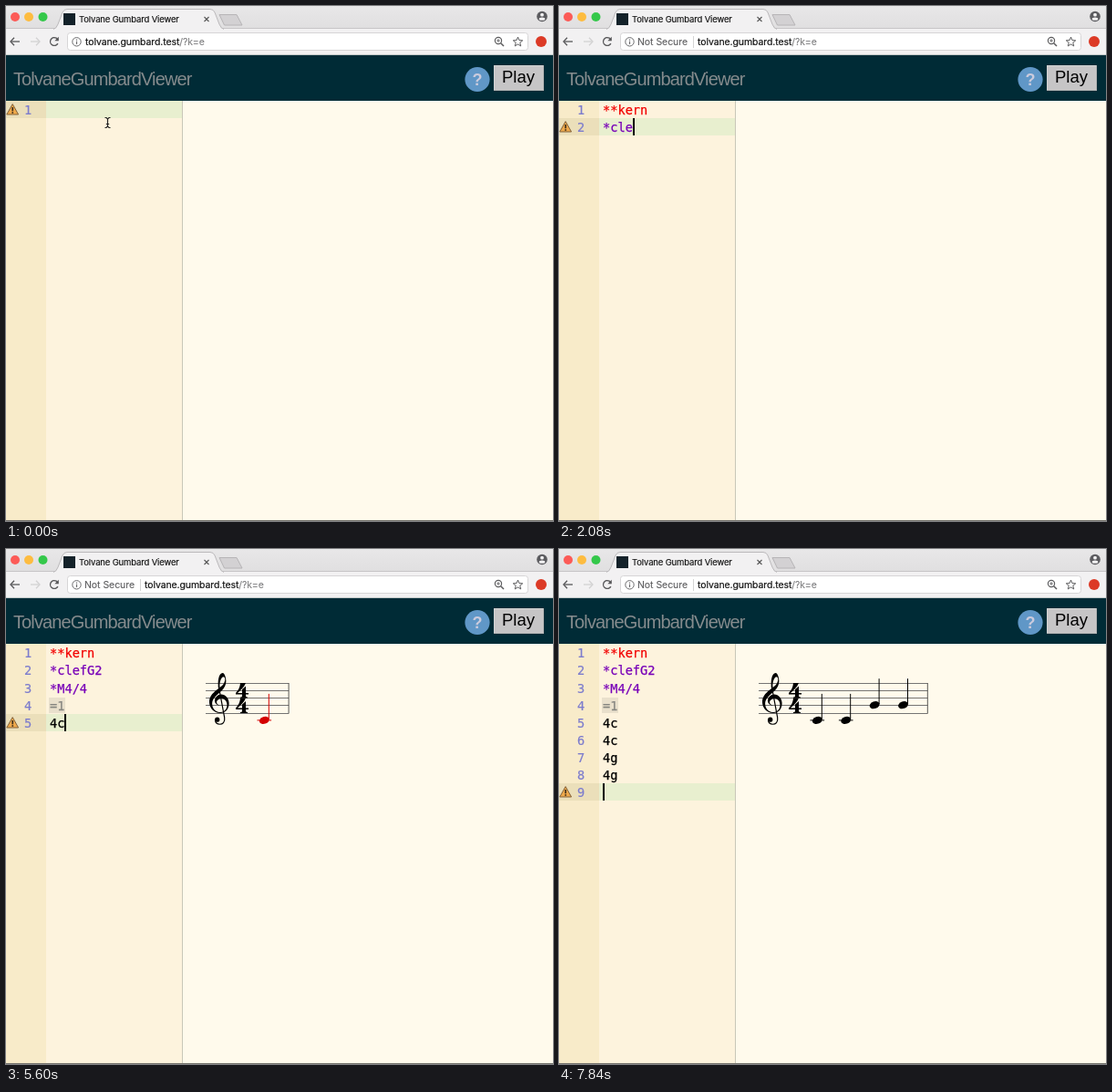
Animation of 600x565 px, one loop 8 s. Source, as an HTML page with a canvas:

```html
<!DOCTYPE html>
<html lang="en">
<head>
<meta charset="utf-8">
<title>Score editor</title>
<style>
html, body { margin: 0; width: 100%; height: 100%; overflow: hidden; background: #fffaec; }
canvas { display: block; width: 600px; height: 565px; }
</style>
</head>
<body>
<canvas id="stage"></canvas>
<script>
const LOOP = 8000, STEP = 160;
const W = 600, H = 565;
const UI = 'Inter, Roboto, sans-serif';
const ARIAL = '"Liberation Sans", Arial, sans-serif';
const MONO = '13.65px "DejaVu Sans Mono", monospace';
const CHAR = 8.22, LINE = 19.13, TOP = 104.3, TEXT_X = 48;

// Typing: start time, time per key, keys
const TYPING = [
  [480, 320, '**'], [960, 80, 'ker'], [1280, 160, 'n\n'],
  [1600, 160, '*clefG2'], [2880, 320, '\n*'], [3360, 160, 'M4/4'],
  [4160, 320, '\n='], [4640, 320, '1\n'], [5280, 160, '4c'],
  [5760, 160, '\n4c'], [6880, 80, '\n4g'], [7280, 160, '\n'],
  [7440, 80, '4g'], [7680, 160, '\n']
];

const canvas = document.getElementById('stage');
const g = canvas.getContext('2d');
const dpr = window.devicePixelRatio || 1;
canvas.width = W * dpr;
canvas.height = H * dpr;

function typedAt(t) {
  let text = '', last = 160;
  for (const [start, gap, keys] of TYPING) {
    [...keys].forEach((key, i) => {
      const at = start + i * gap;
      if (at <= t) { text += key; last = at; }
    });
  }
  return { text, last, lines: text.split('\n') };
}

function rect(x, y, w, h, color) {
  g.fillStyle = color;
  g.fillRect(x, y, w, h);
}

function dot(x, y, r, color) {
  g.fillStyle = color;
  g.beginPath();
  g.arc(x, y, r, 0, Math.PI * 2);
  g.fill();
}

function ring(x, y, r, color, width = 1, from = 0, to = Math.PI * 2) {
  g.strokeStyle = color;
  g.lineWidth = width;
  g.beginPath();
  g.arc(x, y, r, from, to);
  g.stroke();
}

// Points as a flat list x, y, x, y...
function trace(p) {
  g.beginPath();
  for (let i = 0; i < p.length; i += 2) g.lineTo(p[i], p[i + 1]);
}

function poly(p, fill, stroke) {
  trace(p);
  g.closePath();
  g.fillStyle = fill;
  g.fill();
  if (stroke) { g.strokeStyle = stroke; g.lineWidth = 1; g.stroke(); }
}

function line(p, color, width = 1) {
  trace(p);
  g.strokeStyle = color;
  g.lineWidth = width;
  g.stroke();
}

// weight adds a hairline outline, as heavier font smoothing does
function label(str, x, y, font, color, spacing = 0, weight = 0) {
  g.font = font;
  g.letterSpacing = spacing + 'px';
  g.fillStyle = g.strokeStyle = color;
  g.fillText(str, x, y);
  if (weight) {
    g.lineWidth = weight;
    g.strokeText(str, x, y);
  }
  const width = g.measureText(str).width;
  g.letterSpacing = '0px';
  return width;
}

function drawTabs() {
  const bar = g.createLinearGradient(0, 0, 0, 25);
  bar.addColorStop(0, '#e8e7e8');
  bar.addColorStop(1, '#e0dfe0');
  rect(0, 0, W, 26, bar);
  rect(0, 25, W, 29, '#f2f1f2');
  line([0, 24.5, W, 24.5], '#c6c4c6');
  g.beginPath();
  g.moveTo(52, 25.5);
  g.quadraticCurveTo(55, 25, 57, 20);
  g.lineTo(62, 7);
  g.quadraticCurveTo(63.5, 3.5, 67, 3.5);
  g.lineTo(224, 3.5);
  g.quadraticCurveTo(227.5, 3.5, 229, 7);
  g.lineTo(234, 20);
  g.quadraticCurveTo(236, 25, 239, 25.5);
  g.fillStyle = '#f2f1f2';
  g.fill();
  g.strokeStyle = '#bbb9bb';
  g.lineWidth = 1;
  g.stroke();
  rect(53, 25, 185, 2, '#f2f1f2');

  dot(10, 12, 5, '#fc5b57');
  dot(25, 12, 5, '#fdbc40');
  dot(40.5, 12, 5, '#34c84a');
  rect(63, 8, 13, 13, '#14222a');
  label('Tolvane Gumbard Viewer', 80, 18, '9.5px ' + UI, '#111', -0.15, 0.15);
  line([217.5, 12, 222.5, 17], '#555', 1.1);
  line([222.5, 12, 217.5, 17], '#555', 1.1);
  poly([234, 9.5, 253, 9.5, 259, 21, 239.5, 21], '#d3d1d3', '#b6b4b6');
  dot(588, 11.5, 5.8, '#5b5b5f');
  dot(588, 9.7, 1.9, '#f2f1f2');
  g.beginPath();
  g.ellipse(588, 14.2, 3.3, 1.6, 0, 0, Math.PI * 2);
  g.fill();
}

function arrow(x, dir, color) {
  line([x - 5 * dir, 39, x + 5 * dir, 39], color, 1.3);
  line([x + dir, 34.8, x + 5 * dir, 39, x + dir, 43.2], color, 1.3);
}

function drawToolbar(t) {
  arrow(10, -1, '#58585a');
  arrow(32, 1, '#d3d2d3');
  ring(53, 39, 4.4, '#58585a', 1.4, 0.5, 5.6);
  poly([57.8, 33.8, 57.8, 38.3, 53.3, 38.3], '#58585a');
  g.beginPath();
  g.roundRect(67.5, 29.5, 505, 19, 3);
  g.fillStyle = '#fff';
  g.fill();
  g.strokeStyle = '#d6d5d6';
  g.lineWidth = 1;
  g.stroke();

  ring(77.5, 39.3, 4.7, '#6a6a6c');
  rect(77, 36.5, 1.1, 1.2, '#6a6a6c');
  rect(77, 38.6, 1.1, 3.4, '#6a6a6c');

  // The security notice slides the address to the right
  const p = Math.max(0, Math.min(1, (t - 384) / 400));
  if (p > 0) {
    g.save();
    g.beginPath();
    g.rect(85, 30, 58 * p - (p < 1 ? 5 : 0), 18);
    g.clip();
    g.globalAlpha = p;
    if (p < 1) label('Not Secure', 90, 42, '8.3px ' + UI, '#777');
    else label('Not Secure', 86, 43, '10.5px ' + UI, '#5c5c5e', -0.05, 0.1);
    g.restore();
    if (p === 1) line([147.5, 33, 147.5, 46], '#d5d5d5');
  }
  const x = 87 + 65 * p;
  const host = label('tolvane.gumbard.test', x, 43, '10.5px ' + UI, '#151515', -0.1, 0.2);
  label('/?k=e', x + host, 43, '10.5px ' + UI, '#7d7d7f', -0.1, 0.1);

  ring(540, 38, 3.6, '#5c5c5e', 1.2);
  line([542.7, 40.7, 546, 44], '#5c5c5e', 1.5);
  line([538.2, 38, 541.8, 38], '#5c5c5e', 0.9);
  line([540, 36.2, 540, 39.8], '#5c5c5e', 0.9);
  const star = [];
  for (let i = 0; i < 10; i++) {
    const r = i % 2 ? 2.4 : 5.5, a = i * Math.PI / 5 - Math.PI / 2;
    star.push(561.5 + r * Math.cos(a), 39.5 + r * Math.sin(a));
  }
  poly(star, '#fff', '#5c5c5e');
  dot(587, 39, 6, '#dc3a26');
}

function drawHeader() {
  rect(0, 53, W, 1, '#c2c6c6');
  rect(0, 54, W, 50, '#002b36');
  label('TolvaneGumbardViewer', 8, 87, '20px ' + ARIAL, '#858b8d', -0.88);
  dot(517, 80.5, 13.6, '#6097c7');
  g.textAlign = 'center';
  label('?', 517, 87, 'bold 18px ' + ARIAL, '#cbcbdd');
  g.textAlign = 'left';
  rect(535, 65, 55, 28, '#b4b4b4');
  rect(535, 65, 54, 27, '#d2d2d2');
  rect(536, 66, 53, 26, '#c6c5c6');
  label('Play', 544, 84, '18.5px ' + ARIAL, '#000');
}

function drawIcon(bad, y) {
  if (bad) {
    g.beginPath();
    g.roundRect(1, y + 3, 14, 13.5, 2);
    g.fillStyle = '#cf3a31';
    g.fill();
    g.strokeStyle = '#8f2a25';
    g.lineWidth = 1;
    g.stroke();
    line([4.7, y + 6.5, 11.3, y + 13], '#fff', 2);
    line([11.3, y + 6.5, 4.7, y + 13], '#fff', 2);
    return;
  }
  g.lineJoin = 'round';
  poly([7.2, y + 3.6, 13.6, y + 15, 0.8, y + 15], '#efa94b', '#81623d');
  g.lineJoin = 'miter';
  rect(6.4, y + 7, 1.7, 4.3, '#40301c');
  rect(6.4, y + 12.2, 1.7, 1.6, '#40301c');
}

function inkFor(str) {
  if (str.startsWith('**')) return '#f20000';
  if (str.startsWith('*')) return '#7800b8';
  return str.startsWith('=') ? '#85857f' : '#000';
}

function drawEditor(t, typed, bad) {
  rect(0, 104, 44, H - 104, '#f8ebc9');
  rect(44, 104, 150, H - 104, '#fdf3dd');
  rect(194, 104, W - 194, H - 104, bad ? '#fcd9dc' : '#fffaec');
  const lines = typed.lines, active = lines.length - 1;
  const y = Math.round(TOP + active * LINE);
  rect(0, y, 44, 19, '#ebdfba');
  rect(44, y, 150, 19, '#e8efcf');
  rect(193, 104, 1, H - 104, bad ? '#dcc8bd' : '#c9c7b8');
  drawIcon(bad, y);

  lines.forEach((str, i) => {
    const top = Math.round(TOP + i * LINE), base = top + 15;
    label(String(i + 1), 20, base, MONO, '#7c7ccd', 0, 0.2);
    if (str[0] === '=') rect(47, top + 1, str.length * CHAR + 1.5, 17, 'rgba(130,130,120,.17)');
    label(str, TEXT_X, base, MONO, inkFor(str), 0, 0.25);
  });

  const blinkOn = Math.floor((t - typed.last) / 500) % 2 === 0;
  if (t >= 160 && blinkOn) {
    rect(Math.round(TEXT_X + lines[active].length * CHAR), y, 2, 19, '#000');
  }
  rect(0, 564, W, 1, '#77756f');
}

function drawPointer() {
  line([108.5, 122.5, 110, 122.5, 111.5, 124, 113, 122.5, 114.5, 122.5], '#222', 1.1);
  line([111.5, 124, 111.5, 132], '#222', 1.2);
  line([108.5, 133.5, 110, 133.5, 111.5, 132, 113, 133.5, 114.5, 133.5], '#222', 1.1);
  line([109.8, 129.5, 113.2, 129.5], '#222');
}

// Clef units: 250 per staff space, y up, zero on the G line
const CLEF = new Path2D(`M340-8C230 20 180 100 180 150C180 270 280 365 400 368
  C540 368 655 230 655 80C655-100 560-250 365-251C120-251-1-50-1 118
  C-1 320 150 440 307 563C270 760 300 1083 447 1083C500 1083 557 930 557 817
  C557 640 450 520 372 455C200 310 95 210 95 60C95-120 230-222 380-222
  C510-222 590-110 590 20C590 130 520 225 410 225C310 225 245 160 245 110
  C245 60 290 20 345 2Z
  M350 600C325 760 400 950 470 950C520 950 530 880 520 830C500 720 420 640 350 600Z`);
const CLEF_STEM = new Path2D('M312 640L505-400C530-560 440-622 350-622C260-622 200-570 196-480');
const FOUR = new Path2D(`M5 0L11 0C9 5 5 8 2 11L7 11L7 7L11 3.5L11 11L14 11L14 12.4
  L11 12.4L11 14C11 15.2 12 15.5 13 15.6L13 16.4L5 16.4L5 15.6C6.5 15.5 7 15 7 14
  L7 12.4L0 12.4L0 11C3 8 4.8 4 5 0Z`);

function drawNote(pitch, x, color) {
  const y = pitch === 'c' ? 187.9 : 171.2;
  if (pitch === 'c') line([x - 7.8, y, x + 7.8, y], color);
  line([x + 5, y - 1, x + 5, y - 29], color);
  g.fillStyle = color;
  g.beginPath();
  g.ellipse(x, y, 5.6, 3.9, -0.35, 0, Math.PI * 2);
  g.fill();
}

function drawScore(lines) {
  const isNote = str => /^4[a-g]$/.test(str);
  const notes = lines.filter(isNote);
  if (!notes.length) return;
  const end = 278.7 + notes.length * 31.4;
  for (let i = 0; i < 5; i++) {
    const y = Math.round(146.5 + i * 8.25) + 0.5;
    line([219, y, end, y], '#666', 0.9);
  }
  line([end, 147, end, 180.5], '#444', 0.9);

  g.save();
  g.translate(223, 171.7);
  g.scale(0.033, -0.033);
  g.fillStyle = g.strokeStyle = '#000';
  g.fill(CLEF, 'evenodd');
  g.lineWidth = 36;
  g.stroke(CLEF_STEM);
  dot(265, -468, 80, '#000');
  g.restore();

  g.fillStyle = '#000';
  for (const y of [147, 163.5]) {
    g.save();
    g.translate(252, y);
    g.fill(FOUR);
    g.restore();
  }
  const selected = isNote(lines[lines.length - 1]) ? notes.length - 1 : -1;
  notes.forEach((str, i) => drawNote(str[1], 283.3 + i * 31.4, i === selected ? '#d40000' : '#000'));
}

function draw(t) {
  const typed = typedAt(t);
  const bad = typed.text === '*' || typed.text === '**';
  g.setTransform(dpr, 0, 0, dpr, 0, 0);
  drawTabs();
  drawToolbar(t);
  drawHeader();
  drawEditor(t, typed, bad);
  drawScore(typedAt(t - STEP).lines); // the score lags one step behind the keys
  if (t < 480) drawPointer();
}

const begin = performance.now();
function tick() {
  const t = (performance.now() - begin) % LOOP;
  draw(Math.floor(t / STEP) * STEP);
  requestAnimationFrame(tick);
}
tick();
</script>
</body>
</html>
```
